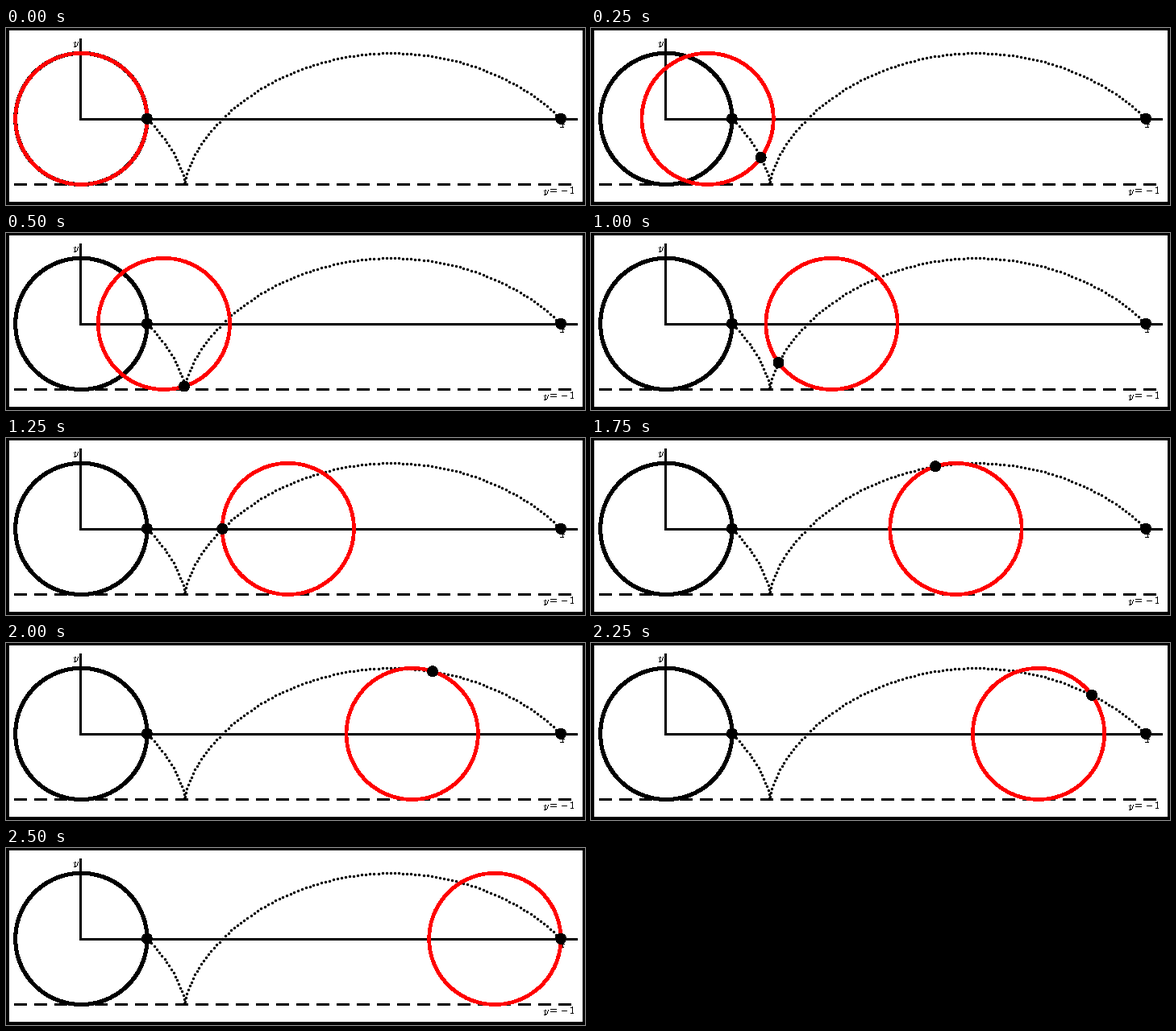
A matplotlib script that plays this animation: 718 px wide and 220 px high, repeating every 2.75 s.

```python
import numpy as np
import matplotlib.pyplot as plt
from matplotlib.animation import FuncAnimation
from matplotlib.patches import Circle, Rectangle

W, H, DPI = 718, 220, 100
PX = 72 / DPI                      # points per pixel
CX, CY, R = 93.3, 112.9, 81.65     # origin and unit length in pixels
UNIT = R / 80                      # drawing unit for dash and dot spacing
AX_X, AX_Y = 92.5, 113.5           # axes sit on whole pixels
STEPS, INTERVAL = 11, 250

plt.rcParams["mathtext.fontset"] = "cm"
plt.rcParams["text.antialiased"] = False
plt.rcParams["lines.scale_dashes"] = False

fig = plt.figure(figsize=(W / DPI, H / DPI), dpi=DPI, facecolor="black")
ax = fig.add_axes([0, 0, 1, 1])
ax.set_xlim(0, W)
ax.set_ylim(H, 0)
ax.axis("off")
ax.add_patch(Rectangle((4, 3), 711, 213, fc="white", lw=0,
                       antialiased=False, zorder=0))


def cycloid(t):
    """Point on the rim after the wheel has rolled through angle t."""
    return CX + R * (t + np.cos(t)), CY + R * np.sin(t)


def stroke(x, y, **kw):
    ax.plot(x, y, color="black", lw=3 * PX, antialiased=False, zorder=2,
            solid_capstyle="round", dash_capstyle="round", snap=False, **kw)


def ring(color, width, z):
    return ax.add_patch(Circle((CX, CY), R, fill=False, ec=color,
                               lw=width * PX, antialiased=False, zorder=z))


def dot(x, y):
    return ax.add_patch(Circle((x, y), 6.4, fc="black", lw=0,
                               antialiased=False, zorder=6))


def label(x, y, text, ha):
    ax.text(x, y, text, fontsize=12 * PX, ha=ha, va="baseline", zorder=3)


# Axes and ground line
right = 707
dash = 12 * UNIT * PX
stroke([AX_X, AX_X], [AX_Y, 14.5])
stroke([AX_X, right], [AX_Y, AX_Y])
stroke([CX - R, right], [AX_Y + 81] * 2, linestyle=(0, (dash, dash)))

# Dots evenly spaced along the arc
t = np.linspace(0, 2 * np.pi, 4000)
px, py = cycloid(t)
arc = np.concatenate([[0], np.cumsum(np.hypot(np.diff(px), np.diff(py)))])
s = np.arange(2.5 * UNIT, arc[-1], 5 * UNIT)
ax.plot(np.interp(s, arc, px), np.interp(s, arc, py), "o", color="black",
        ms=3.4 * PX, mew=0, antialiased=False, snap=False, zorder=2)

label(87, 22, "$y$", "center")
label(690, 124, "$x$", "center")
label(706, 206, "$y=-1$", "right")

ring("black", 4, 2)
for end in (0, 2 * np.pi):
    dot(*cycloid(end))
wheel = ring("red", 3.6, 4)
rim = dot(*cycloid(0))


def update(k):
    angle = 2 * np.pi * k / (STEPS - 1)
    wheel.center = (CX + R * angle, CY)
    rim.center = cycloid(angle)
    return wheel, rim


anim = FuncAnimation(fig, update, frames=STEPS, interval=INTERVAL,
                     repeat=True, repeat_delay=0)
plt.show()
```
